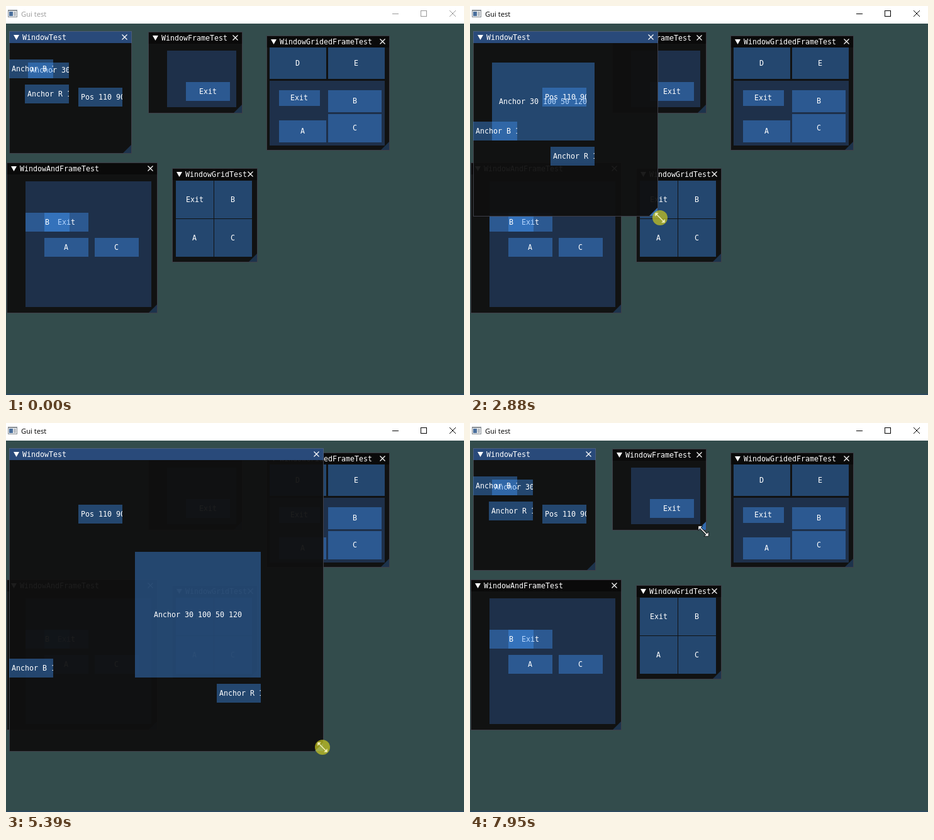
An HTML page with a canvas for the animation above (8000 ms loop, 728x619 px).

```html
<!DOCTYPE html>
<html lang="en">
<head>
<meta charset="utf-8">
<title>Gui test</title>
<style>
  html, body { margin: 0; width: 100%; height: 100%; overflow: hidden; background: #334c4c; }
  canvas { display: block; }
</style>
</head>
<body>
<canvas id="stage" width="728" height="619"></canvas>
<script>
const ctx = document.getElementById('stage').getContext('2d');
const LOOP = 8000;
const ENTER = 420, PRESS = 1800, RELEASE = 6680;
const GLYPH = 7, TITLE = 19, GRIP = 13;
const HOME = [198, 233], FAR = [588, 567], LAST = [367, 161];
const blue = alpha => `rgba(66,150,250,${alpha})`;

// Key points of the pointer: time, x, y
const PATH = [
  [ENTER, 640, 612], [900, 322, 402], [1210, 207, 244], [1540, ...HOME],
  [2240, ...HOME], [2880, 302, 337], [3670, 458, 470], [4410, ...FAR],
  [5060, ...FAR], [5350, 503, 522], [5390, 503, 516], [5850, 343, 375],
  [6670, 131, 222], [7410, ...LAST], [7560, ...LAST], [7950, 371, 172], [LOOP, 371, 172]
];

function pointer(t) {
  const i = Math.max(1, PATH.findIndex(p => p[0] >= t));
  const [a, b] = [PATH[i - 1], PATH[i]];
  const k = Math.max(0, (t - a[0]) / (b[0] - a[0]));
  return [a[1] + (b[1] - a[1]) * k, a[2] + (b[2] - a[2]) * k];
}

const held = t => t >= PRESS && t < RELEASE;

// Dragged corner of the first window, which trails the pointer
function corner(t, lag) {
  const [x, y] = held(t - lag) ? pointer(t - lag) : [0, 0];
  return [Math.max(200, Math.round(x + 2)), Math.max(235, Math.round(y + 3))];
}

function overGrip(t, r, b) {
  if (t < ENTER) return false;
  const [x, y] = pointer(t);
  return x < r && y < b + 2 && x + y > r + b - GRIP;
}

function rect(x, y, w, h, color) {
  ctx.fillStyle = color;
  ctx.fillRect(x, y, w, h);
}

function poly(points, fill, outline) {
  ctx.beginPath();
  for (const [x, y] of points) ctx.lineTo(x, y);
  ctx.closePath();
  if (outline) {
    ctx.strokeStyle = outline;
    ctx.stroke();
  }
  ctx.fillStyle = fill;
  ctx.fill();
}

function cross(x, y, size, color, width) {
  ctx.strokeStyle = color;
  ctx.lineWidth = width;
  ctx.beginPath();
  for (const side of [-size, size]) {
    ctx.moveTo(x - side, y - size);
    ctx.lineTo(x + side, y + size);
  }
  ctx.stroke();
}

function label(text, x, y) {
  ctx.font = '11.63px "DejaVu Sans Mono", monospace';
  ctx.fillStyle = '#fff';
  ctx.fillText(text, x, y);
}

function button(text, x, y, w = 70, h = 30) {
  rect(x, y, w, h, blue(0.4));
  ctx.save();
  ctx.beginPath();
  ctx.rect(x, y, w, h);
  ctx.clip();
  const inset = Math.max(4, (w - text.length * GLYPH) / 2);
  label(text, Math.floor(x + inset), Math.floor(y + h / 2) + 4);
  ctx.restore();
}

function frame(x, y, w, h) {
  rect(x, y, w, h, 'rgba(41,74,122,.54)');
}

// Draws a window, then its content with the window corner as origin
function panel(t, title, x, y, w, h, content, active = false) {
  const grip = active && held(t) ? 0.7 : overGrip(t, x + w, y + h) ? 0.67 : 0.25;
  ctx.save();
  ctx.translate(x, y);
  rect(0, TITLE, w, h - TITLE, 'rgba(15,15,15,.94)');
  rect(0, 0, w, TITLE, active ? '#294a7a' : '#0a0a0a');
  poly([[w - 1, h - 1], [w - 1, h - 1 - GRIP], [w - 1 - GRIP, h - 1]], blue(grip));
  ctx.lineWidth = 1;
  ctx.strokeStyle = 'rgba(110,110,128,.5)';
  ctx.strokeRect(0.5, 0.5, w - 1, h - 1);
  poly([[11.5, 14], [7, 6], [16, 6]], '#fff');
  label(title, 21, 14);
  cross(w - 11.5, 9.5, 4, '#fff', 1.2);
  content();
  ctx.restore();
}

function titleBar(focused) {
  const ink = focused ? '#000' : '#999';
  rect(0, 0, 728, 28, '#fff');
  rect(3, 6, 15, 12, '#868c92');
  rect(4, 8, 13, 9, '#f4f6f8');
  rect(5, 9, 6, 7, '#4a6f9c');
  rect(12, 9, 4, 7, '#b9bec4');
  ctx.font = '11.2px "Open Sans", "Noto Sans", sans-serif';
  ctx.fillStyle = ink;
  ctx.fillText('Gui test', 24, 17);
  rect(614, 12, 10, 1, ink);
  ctx.lineWidth = 1;
  ctx.strokeStyle = ink;
  ctx.strokeRect(659.5, 7.5, 9, 9);
  cross(710, 12, 5, ink, 1);
}

function staticPanels(t) {
  panel(t, 'WindowFrameTest', 226, 41, 150, 130, () => {
    frame(30, 30, 110, 90);
    button('Exit', 60, 80);
  });
  panel(t, 'WindowGridedFrameTest', 414, 47, 196, 183, () => {
    ['D', 'E'].forEach((name, i) => button(name, 5 + i * 93, TITLE, 90, 50));
    frame(5, 72, 183, 103);
    button('Exit', 20, 87, 65, 25);
    button('B', 98, 87, 85, 35);
    button('A', 20, 135, 75, 35);
    button('C', 98, 125, 85, 45);
  });
  panel(t, 'WindowAndFrameTest', 1, 249, 240, 240, () => {
    frame(30, 30, 200, 200);
    button('Exit', 60, 80);
    button('B', 30, 80);
    button('A', 60, 120);
    button('C', 140, 120);
  });
  panel(t, 'WindowGridTest', 264, 258, 136, 150, () => {
    ['Exit', 'B', 'A', 'C'].forEach((name, i) =>
      button(name, 6 + (i % 2) * 61, 20 + (i >> 1) * 61, 60, 60));
  });
}

function anchorPanel(t) {
  const x = 5, y = 40;
  const [r, b] = corner(t, 30);
  const [cr, cb] = corner(t, 40);
  panel(t, 'WindowTest', x, y, r - x, b - y, () => {
    const right = cr - x - 100, low = cb - y - 120;
    const left = Math.max(30, right - 200), top = Math.max(50, low - 200);
    button('Anchor 30 100 50 120', left, top, right - left, low - top);
    button('Anchor R 100 80', right - 70, low + 10);
    button('Anchor B 120', 0, low - 30);
    button('Pos 110 90', 110, 90);
  }, true);
}

function resizeArrow(fill, outline) {
  const half = [[0, -0.8], [7, -0.8], [7, -4], [11, 0], [7, 4], [7, 0.8], [0, 0.8]];
  const back = half.map(([x, y]) => [-x, -y]);
  ctx.rotate(Math.PI / 4);
  poly([...half, ...back], fill, outline);
}

function drawPointer(t) {
  if (t < ENTER) return;
  ctx.save();
  ctx.translate(...pointer(t).map(Math.round));
  ctx.lineWidth = 1.6;
  if (held(t)) {
    ctx.fillStyle = 'rgba(200,198,32,.72)';
    ctx.beginPath();
    ctx.arc(0, 0, 12, 0, Math.PI * 2);
    ctx.fill();
    resizeArrow('#f0eeb4');
  } else if (overGrip(t, 200, 235) || overGrip(t, 376, 171)) {
    resizeArrow('#fff', '#111');
  } else {
    poly([[0.5, 1], [0.5, 16], [4, 12.8], [6.4, 18], [8.6, 17], [6.3, 12], [11, 12]], '#fff', '#111');
  }
  ctx.restore();
}

function draw(t) {
  rect(0, 0, 728, 619, '#334c4c');
  rect(0, 617, 728, 2, '#2c4a5f');
  titleBar(t >= PRESS);
  staticPanels(t);
  anchorPanel(t);
  drawPointer(t);
}

const start = performance.now();
function tick() {
  draw((performance.now() - start) % LOOP);
  requestAnimationFrame(tick);
}
tick();
</script>
</body>
</html>
```
